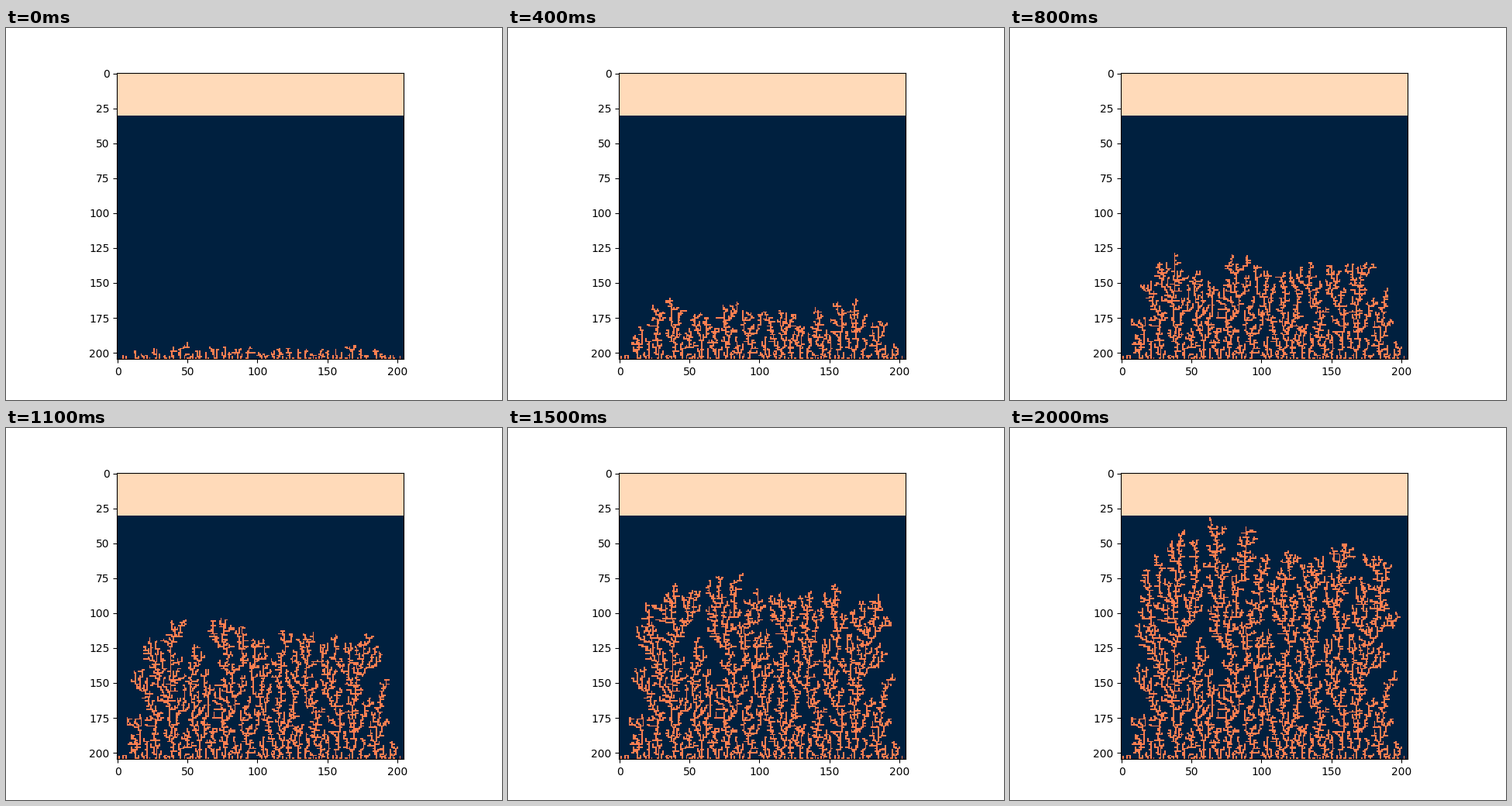
Write a matplotlib script that moves like this. It is 640x480 px and loops after 2100 ms.

```python
import random

import matplotlib.pyplot as plt
import numpy as np
from matplotlib.animation import FuncAnimation
from matplotlib.colors import ListedColormap

SIZE = 205
SKY = 31
FRAMES = 21
FIRST_TIP, LAST_TIP = 193, 32   # row of the highest tip, first and last
W = SIZE + 2                    # one margin column on each side
FREE, NEAR, LOST = 0, 1, 2

# Walkers drift down: left, right, up, down in percent
MOVES = [-1] * 27 + [1] * 27 + [-W] * 11 + [W] * 35


def grow(seed=4):
    """Random walkers fall from the sky and stick to the floor or a branch."""
    rnd = random.Random(seed).random
    cells = np.zeros((SIZE, SIZE), int)
    cells[:SKY] = 2

    state = np.full((SIZE + 1, W), FREE, np.uint8)
    state[:SKY - 10] = LOST
    state[:, [0, -1]] = LOST
    state[SIZE - 1, 1:-1] = NEAR
    state = bytearray(state.tobytes())

    top = SIZE
    shots = []
    for tip in np.linspace(FIRST_TIP, LAST_TIP, FRAMES).round():
        while top > tip:
            p = SKY * W + 1 + int(rnd() * SIZE)
            while state[p] == FREE:
                p += MOVES[int(rnd() * 100)]
            if state[p] == LOST:
                continue
            y, x = divmod(p, W)
            cells[y, x - 1] = 1
            top = min(top, y)
            for q in (p - 1, p + 1, p - W, p + W):
                if state[q] == FREE:
                    state[q] = NEAR
        shots.append(cells.copy())
    return shots


shots = grow()
fig, ax = plt.subplots(figsize=(6.4, 4.8), dpi=100)
cmap = ListedColormap(["#00203f", "coral", "peachpuff"])
image = ax.imshow(shots[0], cmap=cmap, vmin=0, vmax=2, interpolation="nearest")


def update(i):
    image.set_data(shots[i])
    return [image]


anim = FuncAnimation(fig, update, frames=FRAMES, interval=100, repeat=True)
plt.show()
```
